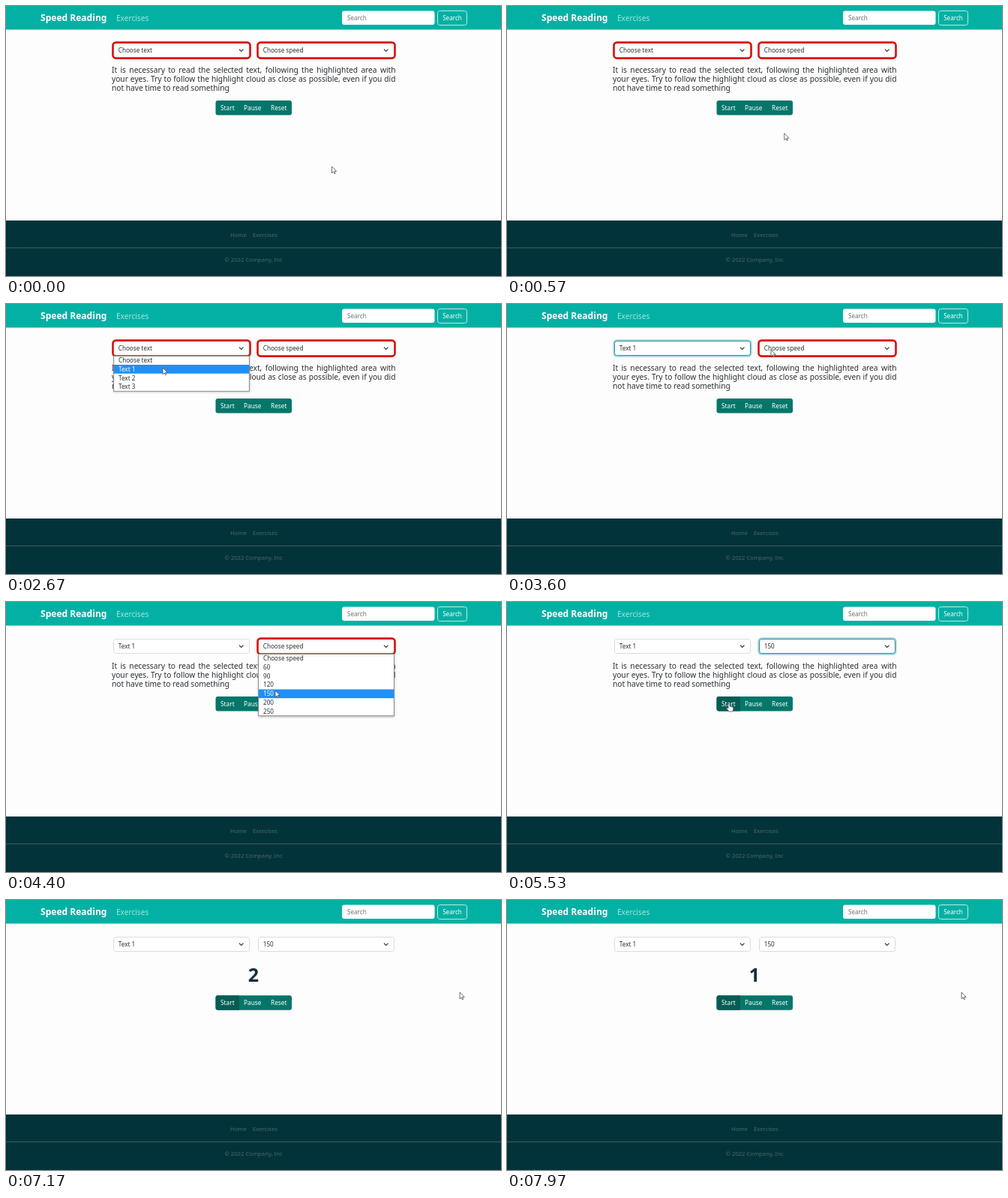
An HTML page with a canvas that plays this animation: 660x360 px, repeating every 8000 ms.

```html
<!DOCTYPE html>
<html lang="en">
<head>
<meta charset="utf-8">
<title>Speed Reading</title>
<style>
  html, body { margin: 0; width: 100%; height: 100%; overflow: hidden; background: #fdfdfd; }
  canvas { display: block; width: 660px; height: 360px; }
</style>
</head>
<body>
<canvas id="stage"></canvas>
<script>
const LOOP = 8000;
const canvas = document.getElementById('stage');
const ctx = canvas.getContext('2d');
const ratio = window.devicePixelRatio || 1;
canvas.width = 660 * ratio;
canvas.height = 360 * ratio;

const INK = '#2a2f33', MUTED = '#4d686c', TEAL = '#03b1a4', DARK = '#02333b', PAPER = '#fdfdfd';
const GREEN = '#05766a', GREEN_DARK = '#045d54';
const ROW = 11.78, LIST_TOP = 69.3, SELECT_WIDTH = 181;

const TEXTS = ['Choose text', 'Text 1', 'Text 2', 'Text 3'];
const SPEEDS = ['Choose speed', '60', '90', '120', '150', '200', '250'];
const INTRO = [
  'It is necessary to read the selected text, following the highlighted area with',
  'your eyes. Try to follow the highlight cloud as close as possible, even if you did',
  'not have time to read something'
];
const BUTTONS = [
  { label: 'Start', from: 279.5, to: 311, x: 286 },
  { label: 'Pause', from: 311, to: 346.5, x: 317 },
  { label: 'Reset', from: 346.5, to: 381, x: 353 }
];

// Moments of the clicks and counter steps, in ms
const AT = { openText: 1700, pickText: 2850, openSpeed: 3700, pickSpeed: 4680, start: 5680, two: 6700, one: 7700 };

// Pointer stops: time, x, y
const PATH = [
  [0, 434.5, 214], [250, 434.5, 214], [1150, 212, 62], [1850, 211, 62], [2450, 209, 85],
  [2900, 209, 85], [3450, 352, 61], [3800, 352, 61], [4350, 359, 118], [4720, 359, 118],
  [5350, 296, 135], [5950, 296, 135], [6430, 384, 136], [7200, 606, 123], [8000, 606, 123]
];

function pointerAt(t) {
  const i = Math.max(1, PATH.findIndex(stop => stop[0] >= t));
  const [t0, x0, y0] = PATH[i - 1], [t1, x1, y1] = PATH[i];
  const p = (t - t0) / (t1 - t0);
  const e = p * p * (3 - 2 * p);
  return { x: x0 + (x1 - x0) * e, y: y0 + (y1 - y0) * e };
}

// Text is centred on the capitals around y
function text(str, x, y, size, color, { align = 'left', weight = 400 } = {}) {
  ctx.font = `${weight} ${size}px "Noto Sans", sans-serif`;
  ctx.textAlign = align;
  ctx.fillStyle = color;
  ctx.fillText(str, x, y + size * 0.357);
}

function box(x0, y0, x1, y1, radius, fill, stroke, width = 1) {
  ctx.beginPath();
  ctx.roundRect(x0, y0, x1 - x0, y1 - y0, radius);
  if (fill) { ctx.fillStyle = fill; ctx.fill(); }
  if (stroke) { ctx.strokeStyle = stroke; ctx.lineWidth = width; ctx.stroke(); }
}

function drawHeader() {
  box(0, 0, 660, 31.5, 0, TEAL);
  text('Speed Reading', 46, 16, 12.05, '#fff', { weight: 600 });
  text('Exercises', 147, 16, 10.1, '#a3e3dc');
  box(448, 6.5, 571.5, 25, 3, '#fff');
  text('Search', 455, 16, 8.14, '#6c7276');
  box(575.5, 6.5, 614.5, 25.5, 3, null, '#bfeae5');
  text('Search', 595, 16, 8.14, '#fff', { align: 'center' });
}

function drawFooter() {
  box(0, 286, 660, 360, 0, DARK);
  box(0, 322, 660, 323, 0, '#3a5f62');
  text('Home', 299, 305, 7.7, MUTED);
  text('Exercises', 329, 305, 7.7, MUTED);
  text('© 2022 Company, Inc', 330, 338, 7.7, MUTED, { align: 'center' });
}

function drawSelect(x, label, state) {
  const right = x + SELECT_WIDTH;
  if (state === 'missing') box(x - 1, 48.6, right + 1, 69.6, 4, '#fff', '#dc0a0a', 2.6);
  else {
    if (state === 'focus') box(x - 1, 48.5, right + 1, 69.5, 4, null, '#a4d6dc', 2.4);
    box(x, 49.5, right, 68.5, 3, '#fff', state === 'focus' ? '#2c8fa5' : '#d6ddda');
  }
  text(label, x + 6.3, 59.2, 8.14, INK);
  ctx.beginPath();
  ctx.moveTo(right - 13.6, 57.7);
  ctx.lineTo(right - 10.8, 60.5);
  ctx.lineTo(right - 8, 57.7);
  ctx.strokeStyle = INK;
  ctx.lineWidth = 1.1;
  ctx.stroke();
}

function drawList(x, items, pointerY) {
  const right = x + SELECT_WIDTH, bottom = LIST_TOP + items.length * ROW;
  const active = Math.max(0, Math.floor((pointerY - LIST_TOP) / ROW));
  ctx.save();
  ctx.shadowColor = 'rgba(60,60,60,.3)';
  ctx.shadowBlur = 3 * ratio;
  ctx.shadowOffsetY = ratio;
  box(x, LIST_TOP, right, bottom, 0, '#fff', '#7c7c78', 0.8);
  ctx.restore();
  items.forEach((item, i) => {
    const top = LIST_TOP + i * ROW;
    if (i === active) box(x + 0.4, top, right - 0.4, top + ROW, 0, '#1e90f8');
    text(item, x + 6.5, top + ROW / 2, 8.14, i === active ? '#fff' : INK);
  });
}

function drawIntro() {
  INTRO.forEach((line, i) => {
    ctx.font = '400 10.18px "Noto Sans", sans-serif';
    const words = line.split(' ');
    const wordsWidth = words.reduce((sum, w) => sum + ctx.measureText(w).width, 0);
    const gap = i < 2 ? (378.5 - wordsWidth) / (words.length - 1) : ctx.measureText(' ').width;
    let x = 141;
    for (const word of words) {
      text(word, x, 85.2 + i * 12.22, 10.18, INK);
      x += ctx.measureText(word).width + gap;
    }
  });
}

function overButtons({ x, y }, top) {
  return x > 279.5 && x < 381 && y > top && y < top + 19.5;
}

function drawButtons(top, pointer, started) {
  box(279.5, top, 381, top + 19.5, 3, GREEN);
  BUTTONS.forEach(({ label, from, to, x }, i) => {
    const hover = overButtons(pointer, top) && pointer.x >= from && pointer.x < to;
    if (hover || (started && i === 0)) {
      const left = i === 0 ? 3 : 0, right = i === 2 ? 3 : 0;
      box(from, top, to, top + 19.5, [left, right, right, left], GREEN_DARK);
    }
    text(label, x, top + 9.8, 8.3, '#fff');
  });
}

const ARROW = new Path2D('M0 0V8.8L2.1 6.9 3.5 9.8 4.7 9.2 3.4 6.4H6.1Z');
const HAND = new Path2D('M-1 1Q0 -.6 1 1V4L5 5Q6 5.3 5.8 7L5 11H0L-3.3 7Q-3.5 5.6-2 6L-1 7Z');

function drawPointer(shape, { x, y }) {
  ctx.save();
  ctx.translate(x, y);
  ctx.fillStyle = '#fff';
  ctx.strokeStyle = '#4a4d50';
  ctx.lineWidth = 0.8;
  ctx.lineJoin = 'round';
  ctx.fill(shape);
  ctx.stroke(shape);
  ctx.restore();
}

function draw(t) {
  const pointer = pointerAt(t);
  const started = t >= AT.start;
  const textPicked = t >= AT.pickText, speedPicked = t >= AT.pickSpeed;
  const textOpen = t >= AT.openText && !textPicked;
  const speedOpen = t >= AT.openSpeed && !speedPicked;
  const top = started ? 127.3 : 126;

  ctx.setTransform(ratio, 0, 0, ratio, 0, 0);
  box(0, 0, 660, 360, 0, PAPER);
  drawHeader();
  drawFooter();

  const textState = !textPicked ? 'missing' : t < AT.openSpeed ? 'focus' : 'plain';
  const speedState = !speedPicked ? 'missing' : started ? 'plain' : 'focus';
  drawSelect(143.5, textPicked ? TEXTS[1] : TEXTS[0], textState);
  drawSelect(336.5, speedPicked ? SPEEDS[4] : SPEEDS[0], speedState);

  if (started) {
    const count = t < AT.two ? '3' : t < AT.one ? '2' : '1';
    text(count, 330, 99.6, 25, '#12303a', { align: 'center', weight: 600 });
  } else drawIntro();
  drawButtons(top, pointer, started);

  if (textOpen) drawList(143.5, TEXTS, pointer.y);
  if (speedOpen) drawList(336.5, SPEEDS, pointer.y);
  drawPointer(overButtons(pointer, top) && !speedOpen ? HAND : ARROW, pointer);
}

const begin = performance.now();
function frame() {
  draw((performance.now() - begin) % LOOP);
  requestAnimationFrame(frame);
}
frame();
</script>
</body>
</html>
```
